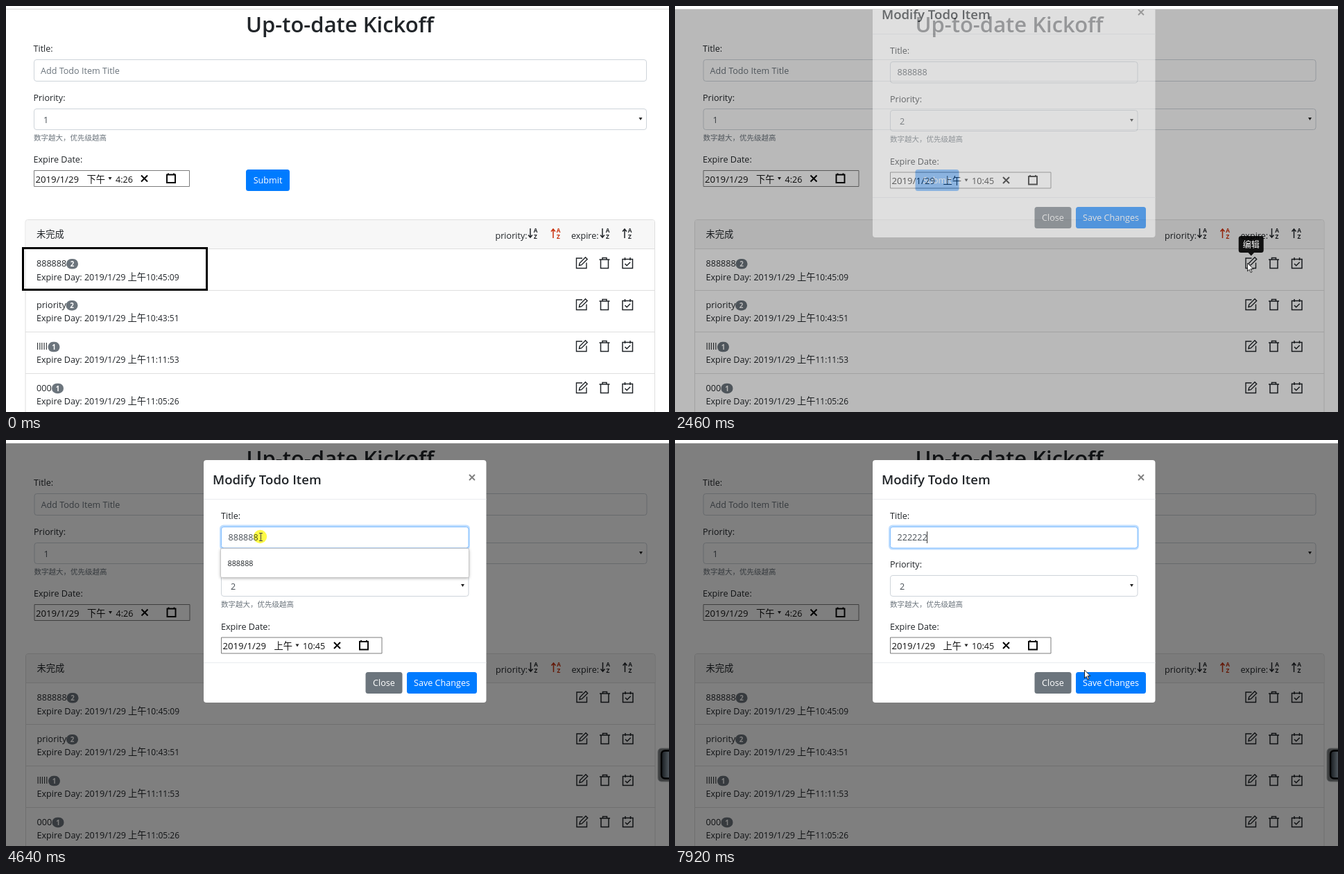
An HTML page with a canvas that plays this animation: 956x586 px, repeating every 8000 ms.

```html
<!DOCTYPE html>
<html lang="en">
<head>
<meta charset="utf-8">
<title>Task list</title>
<style>
html, body { margin: 0; width: 100%; height: 100%; overflow: hidden; background: #fff; }
canvas { display: block; }
</style>
</head>
<body>
<canvas id="stage" width="956" height="586"></canvas>
<script>
const W = 956, H = 586, LOOP = 8000, STEP = 78;
const LATIN = '"Open Sans", "Noto Sans", sans-serif';
const CJK = '"Noto Sans CJK SC", "Noto Sans CJK", sans-serif';
const INK = '#212529', GREY = '#6c757d', FIELD = '#495057', BLUE = '#007bff', LINE = '#ced4da';
const HINT = '数字越大，优先级越高';

const screen = document.getElementById('stage').getContext('2d');
const layer = document.createElement('canvas');
layer.width = W;
layer.height = H;
const modalCtx = layer.getContext('2d');
let c = screen;

const clamp = v => Math.max(0, Math.min(1, v));
const within = (t, a, b) => t >= a && t < b;

// Pointer stops: time, x, y
const path = [
  [196, 924, 572], [600, 878, 468], [976, 834, 372], [1600, 834, 372], [1912, 825, 371],
  [2926, 825, 371], [3082, 591, 257], [3550, 409, 147], [3940, 367, 140], [4640, 367, 140],
  [5040, 282, 140], [5190, 282, 140], [5270, 279, 140], [6740, 279, 140], [7520, 453, 253], [7918, 590, 332]
];

function pointerAt(t) {
  let i = 1;
  while (i < path.length - 1 && path[i][0] < t) i++;
  const [t0, x0, y0] = path[i - 1], [t1, x1, y1] = path[i];
  const k = clamp((t - t0) / (t1 - t0));
  return [x0 + (x1 - x0) * k, y0 + (y1 - y0) * k];
}

function text(s, x, y, o = {}) {
  c.font = `${o.weight || 400} ${o.size || 12.6}px ${o.font || LATIN}`;
  c.fillStyle = o.color || INK;
  c.textAlign = o.align || 'left';
  c.fillText(s, x, y);
}

const han = (s, x, y, o = {}) => text(s, x, y, { size: 13.3, font: CJK, ...o });

function box(x, y, w, h, r, fill, stroke, lw = 1) {
  c.beginPath();
  c.roundRect(x, y, w, h, r);
  if (fill) { c.fillStyle = fill; c.fill(); }
  if (stroke) { c.strokeStyle = stroke; c.lineWidth = lw; c.stroke(); }
}

function rule(x0, x1, y, color) {
  c.fillStyle = color;
  c.fillRect(x0, y, x1 - x0, 1);
}

function draw(d, x, y, color = INK, lw = 1.5) {
  c.save();
  c.translate(x, y);
  c.strokeStyle = color;
  c.lineWidth = lw;
  c.stroke(new Path2D(d));
  c.restore();
}

function triangle(x, y) {
  c.fillStyle = '#222';
  c.fill(new Path2D(`M${x - 2.5} ${y - 2}h5l-2.5 4z`));
}

function button(s, x, y, w, color) {
  box(x, y, w, 31, 3.5, color);
  text(s, x + w / 2, y + 20, { color: '#fff', align: 'center' });
}

function select(value, x, y, w) {
  box(x, y, w, 30, 3.5, '#fff', LINE);
  text(value, x + 13.5, y + 20.5, { color: FIELD });
  triangle(x + w - 8.5, y + 14.5);
  han(HINT, x - 0.5, y + 45.5, { size: 10.5, color: GREY });
}

function dateField(x, y, w, half, time, extra) {
  box(x, y, w, 23, 0, '#fff', '#7c7c7c');
  text('2019/1/29', x + 2, y + 17, { size: 13.2, color: '#111' });
  han(half, x + 76, y + 17, { color: '#111' });
  triangle(x + 109.5, y + 11.5);
  text(time, x + 117.5, y + 17, { color: '#111' });
  draw('M-4.5-4.5l9 9M4.5-4.5l-9 9', x + 159 + extra, y + 11.5, '#000', 2);
  draw('M-6-5.5h12v11.5h-12zM-4-7.5v3M4-7.5v3', x + 197.5 + extra, y + 11.5, '#000', 1.9);
}

function sortIcon(x, up, color = INK) {
  draw(up ? 'M3 335V322M0 325.5l3-3.5l3 3.5' : 'M3 321V334M0 330.5l3 3.5l3-3.5', x, 0, color, 1.5);
  for (const [letter, y] of [['A', 327], ['Z', 335.5]]) {
    text(letter, x + 10.5, y, { size: 8.3, weight: 700, color, align: 'center' });
  }
}

function row(i, title, badgeX, count, time) {
  const y = 350.5 + i * 59.9;
  if (i) rule(28, 935.5, Math.round(y - 0.5), '#dfdfdf');
  text(title, 44, y + 25.5);
  box(badgeX, y + 14.5, 17, 14.5, 7.2, GREY);
  text(count, badgeX + 8.5, y + 25.5, { size: 9.8, weight: 700, color: '#fff', align: 'center' });
  text('Expire Day: 2019/1/29', 44, y + 45);
  han('上午', 175.5, y + 45);
  text(time, 202, y + 45, { size: 12 });
  const m = Math.round(y + 20.5);
  draw('M1-7h-8.500v14.500h14.500v-8M-3.500 3.500l.7-3.500l8.300-8.300l2.700 2.700l-8.300 8.300z', 830, m, INK, 1.4);
  draw('M-7.500-5h15M-3-5v-2.500h6v2.500M-5.500-5v12.500h11v-12.500', 863, m);
  draw('M-7-5.500h14.500v13h-14.500zM-3.500-8v4M4-8v4M-3.500 1l2.700 2.700l5-5', 896, m);
}

function page() {
  rule(0, W, 4, '#d9d9d9');
  text('Up-to-date Kickoff', 481.5, 38, { size: 31, weight: 600, align: 'center' });
  text('Title:', 39.5, 66);
  box(40.5, 77.5, 883, 31, 3.5, '#fff', LINE);
  text('Add Todo Item Title', 50, 98, { color: GREY });
  text('Priority:', 39.5, 137);
  select('1', 40.5, 148.5, 883);
  text('Expire Date:', 39.5, 226);
  dateField(40.5, 237.5, 224, '下午', '4:26', 0);
  button('Submit', 346, 236, 63, BLUE);

  box(28, 308.5, 907.5, 300, 3.5, '#fff', '#dfdfdf');
  box(28.5, 309, 906.5, 41, [3, 3, 0, 0], '#f7f7f7');
  rule(28, 935.5, 350, '#dfdfdf');
  han('未完成', 44, 333.5);
  text('priority:', 705.5, 336);
  sortIcon(753, false);
  sortIcon(786, true, '#c9300c');
  text('expire:', 815, 336);
  sortIcon(857, false);
  sortIcon(889, true);
  row(0, '888888', 87, '2', '10:45:09');
  row(1, 'priority', 86.5, '2', '10:43:51');
  row(2, 'lllll', 60.5, '1', '11:11:53');
  row(3, '000', 66, '1', '11:05:26');
}

function marker(t) {
  const k = clamp((t - 210) / 390);
  const mix = (a, b) => a + (b - a) * k;
  const x = mix(24.5, 29.5), y = mix(349.5, 351.5);
  c.strokeStyle = '#000';
  c.lineWidth = 3;
  c.strokeRect(x, y, mix(289.5, 274.5) - x, mix(409.5, 406.5) - y);
}

function titleField(t) {
  const focus = clamp((t - 3700) / 150);
  if (focus) box(308, 122.5, 361, 36, 5.5, `rgba(0,123,255,${0.25 * focus})`);
  box(310.5, 125.5, 356.5, 30.5, 3.5, '#fff', focus > 0.5 ? '#80bdff' : LINE);

  let value = '888888';
  if (t >= 5820) value = '2'.repeat(t < 6370 ? 1 : t < 6445 ? 3 : t < 6520 ? 5 : 6);
  const [px] = pointerAt(t);
  const from = Math.max(320.5, px);
  text(value, 320.5, 145, { color: FIELD });
  const end = 320.5 + c.measureText(value).width;
  if (within(t, 4640, 5820) && from < end) {
    c.save();
    c.beginPath();
    c.rect(from, 131, end - from, 18);
    c.clip();
    c.fillStyle = '#3390ff';
    c.fillRect(from, 131, end - from, 18);
    text(value, 320.5, 145, { color: '#fff' });
    c.restore();
  }
  const caret = within(t, 3700, 4260) || within(t, 4510, 4640) || within(t, 5820, 7050) || t >= 7610;
  if (caret) {
    c.fillStyle = '#333';
    c.fillRect(Math.floor(end), 132, 1, 17);
  }
}

function suggestion() {
  c.save();
  c.shadowColor = 'rgba(0,0,0,.35)';
  c.shadowBlur = 4;
  c.shadowOffsetY = 1;
  box(309.5, 156.5, 358, 42, 2, '#fff');
  c.restore();
  box(309.5, 156.5, 358, 42, 2, null, '#c8c8c8');
  text('888888', 319.5, 181.5, { size: 10.8 });
}

function modal(t) {
  box(285, 29, 407.5, 350, 4, '#fff');
  text('Modify Todo Item', 298, 64, { size: 18.6, weight: 600 });
  draw('M-4-4l8 8M4-4l-8 8', 672, 54, '#7f7f7f', 1.9);
  rule(285, 692.5, 85, '#e9ecef');
  text('Title:', 310, 114);
  text('Priority:', 310, 184);
  select('2', 310.5, 195.5, 356.5);
  text('Expire Date:', 310, 274);
  dateField(310.5, 285, 231.5, '上午', '10:45', 8);
  rule(285, 692.5, 321, '#e9ecef');
  button('Close', 518.5, 335, 53, GREY);
  button('Save Changes', 578, 335, 101, BLUE);
  titleField(t);
  if (within(t, 4510, 5820)) suggestion();
}

function showModal(t, q) {
  const age = q - 2376;
  const fade = clamp(age / 150);
  const lift = Math.round(-85 * Math.pow(1 - clamp(age / 300), 2));
  c.fillStyle = `rgba(0,0,0,${fade * 0.5})`;
  c.fillRect(0, 5, W, H);

  c = modalCtx;
  c.clearRect(0, 0, W, H);
  modal(t);
  c = screen;
  c.save();
  c.beginPath();
  c.rect(0, 5, W, H);
  c.clip();
  c.globalAlpha = fade;
  c.drawImage(layer, 0, lift);
  c.restore();
}

function tooltip(alpha) {
  c.save();
  c.globalAlpha = alpha * 0.9;
  box(812.7, 332, 36, 24, 3.5, '#000');
  c.fill(new Path2D('M826.500 356h8.500l-4.250 4.500z'));
  c.globalAlpha = alpha;
  han('编辑', 830.8, 348.5, { size: 12, color: '#fff', align: 'center' });
  c.restore();
}

// Floating panel peeking in from the right edge
function sidePanel() {
  box(940, 445, 30, 48, 5, '#3d3f40', '#5c5e5f');
  const g = c.createLinearGradient(946, 0, 958, 0);
  g.addColorStop(0, '#1b2024');
  g.addColorStop(1, '#596168');
  box(945, 448.5, 30, 40, 5, g, '#000', 2.4);
}

function pointer(t, q) {
  const [x, y] = pointerAt(q);
  if (within(t, 2140, 2330) || within(t, 3700, 3860) || within(t, 4510, 5120)) {
    c.save();
    c.globalCompositeOperation = 'multiply';
    c.fillStyle = 'rgba(255,250,0,.72)';
    c.beginPath();
    c.arc(x - 0.5, y - 0.5, 9.7, 0, 7);
    c.fill();
    c.restore();
  }
  if (within(t, 3470, 5280)) {
    draw('M-2.500-5.500h5M0-5.500v11M-2.500 5.500h5', x + 0.5, y, '#444', 1);
    return;
  }
  c.save();
  c.translate(x + 0.5, y);
  const arrow = new Path2D('M0 0v11.800l2.700-2.500l2 4.400l1.800-.8l-2-4.300h3.900z');
  c.fillStyle = '#fff';
  c.fill(arrow);
  c.strokeStyle = '#111';
  c.lineWidth = 0.9;
  c.stroke(arrow);
  c.restore();
}

function render(t) {
  // Motion advances in even ticks
  const q = 2380 + Math.floor((t - 2380) / STEP) * STEP;
  const open = t >= 2460;
  c = screen;
  c.fillStyle = '#fff';
  c.fillRect(0, 0, W, H);
  c.save();
  if (open) c.translate(0.5, 0);
  page();
  c.restore();
  if (open) showModal(t, q);
  else marker(q);
  const tip = Math.min(clamp((q - 830) / 150), 1 - clamp((q - 2500) / 150));
  if (tip > 0) tooltip(tip);
  if (t >= 3780) sidePanel();
  if (t >= 210) pointer(t, q);
}

const start = performance.now();
function tick() {
  render((performance.now() - start) % LOOP);
  requestAnimationFrame(tick);
}
tick();
</script>
</body>
</html>
```
